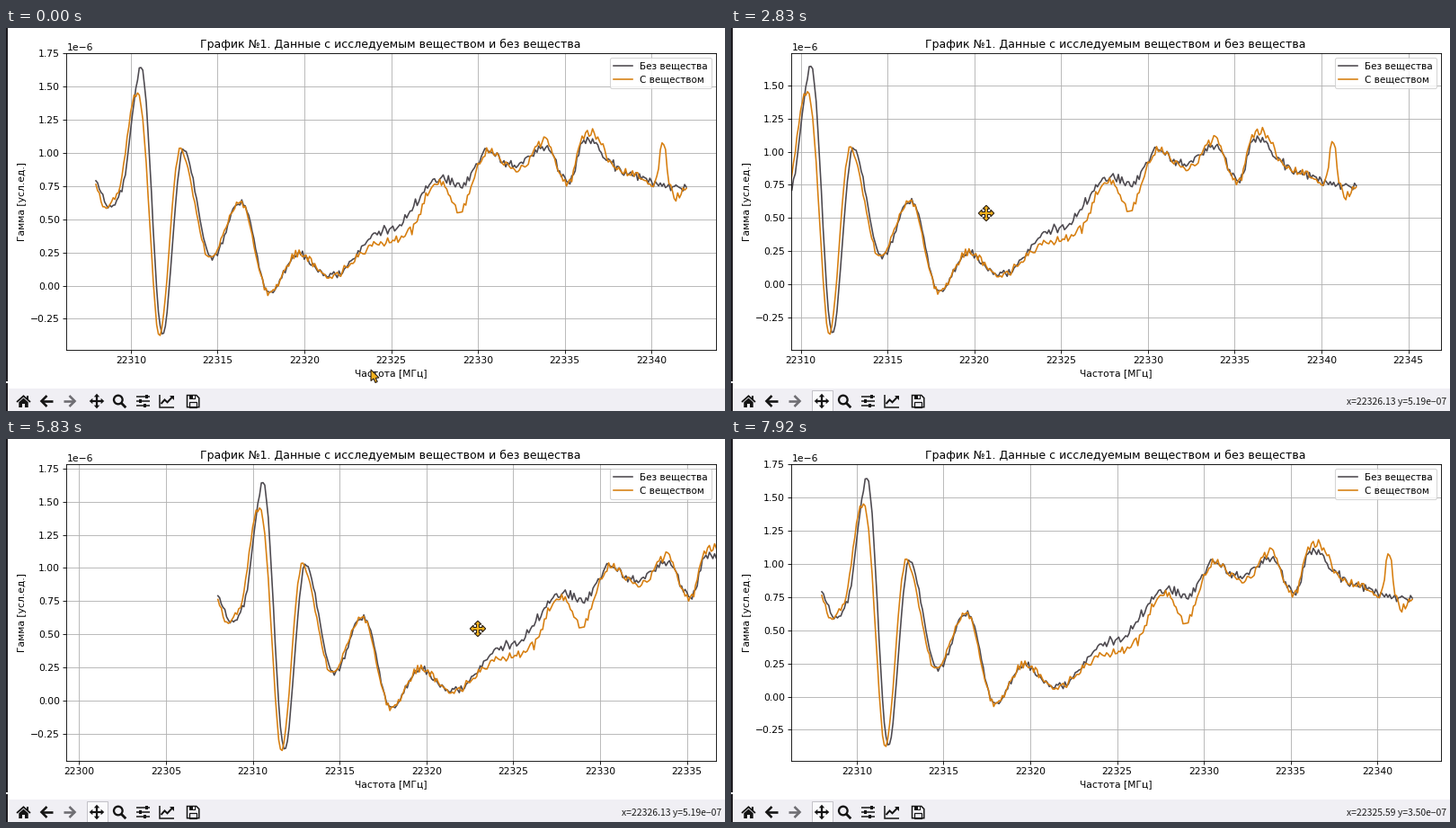
A matplotlib script that plays this animation: 800x426 px, repeating every 8000 ms.

```python
import numpy as np
import matplotlib.pyplot as plt
from matplotlib.animation import FuncAnimation
from matplotlib.patches import Circle, Polygon, Rectangle

W, H, DPI = 800, 426, 72          # at 72 dpi one point is one pixel
LOOP, INTERVAL, STEP = 8000, 40, 1000 / 12
PT = 77 / 72                      # scale of the plotted window's own points
LEFT, RIGHT, TOP, BOTTOM = 67.4, 789.8, 28, 357.5
X0, X1 = 22306.3, 22343.7
Y1 = 1.752e-6
PX = (RIGHT - LEFT) / (X1 - X0)   # pixels per MHz
PY = 147.6e6                      # pixels per unit of gamma
Y0 = Y1 - (BOTTOM - TOP) / PY
INK, ORANGE, ICON = "#4d494f", "#d77f10", "#141414"

plt.rcParams.update({
    "font.family": "DejaVu Sans", "font.size": 10 * PT,
    "axes.linewidth": 0.8 * PT, "grid.linewidth": 0.8 * PT,
    "lines.linewidth": 1.5 * PT, "axes.titlepad": 6 * PT,
    "axes.labelpad": 4 * PT, "toolbar": "None",
    "patch.linewidth": PT,
})
for side in ("xtick", "ytick"):
    plt.rcParams.update({side + ".major.size": 3.5 * PT,
                         side + ".major.pad": 3.5 * PT,
                         side + ".major.width": 0.8 * PT})


def smooth(x, xs, ys):
    """Monotone cubic through the knots, flat outside them."""
    xs, ys = np.asarray(xs, float), np.asarray(ys, float)
    h = np.diff(xs)
    d = np.diff(ys) / h
    prod = d[:-1] * d[1:]
    m = np.zeros(len(xs))
    total = np.where(prod > 0, d[:-1] + d[1:], 1)
    m[1:-1] = np.where(prod > 0, 2 * prod / total, 0)
    i = np.clip(np.searchsorted(xs, x, "right") - 1, 0, len(xs) - 2)
    s = np.clip((x - xs[i]) / h[i], 0, 1)
    return (ys[i] * (1 + 2 * s) * (1 - s) ** 2 + ys[i + 1] * s * s * (3 - 2 * s)
            + h[i] * s * (1 - s) * (m[i] * (1 - s) - m[i + 1] * s))


def to_data(px, py):
    return X0 + (px - LEFT) / PX, Y1 - (py - TOP) / PY


# Peaks and troughs of the plain curve, in pixels of the home view.
TURNS = [(100, 171), (114, 200), (129, 179), (150.5, 44), (174, 342),
         (197, 135), (229, 256), (261.5, 193), (293, 294), (325, 251),
         (362, 276), (416, 226), (430, 223), (486, 166), (504, 177),
         (535, 137), (563, 153), (600, 131), (626, 172), (644, 123),
         (685, 159), (757, 178)]
# What the substance adds to it: centre, height, width.
BUMPS = [(148, 29, 6), (425, 14, 22), (454, 18, 10), (506, 27, 12),
         (575, 8, 10), (602, -10, 6), (655, -10, 8), (731, -48, 4),
         (746, 11, 6)]


def plain(px):
    return smooth(px, *zip(*TURNS))


def sample(px):
    lead = np.interp(px, [200, 260], [3.4, 0.6])
    return plain(px + lead) + sum(
        a * np.exp(-((px - c) / w) ** 2 / 2) for c, a, w in BUMPS)


def noisy(shape, seed):
    px = np.linspace(100, 757, 341)
    jitter = np.random.default_rng(seed).normal(0, 1, px.size).clip(-1.8, 1.8)
    amp = np.interp(px, [200, 450], [1.7, 3])
    return to_data(px, shape(px) + amp * jitter)


# Mouse and plot shift over time: ms, x, y. The redraw lags behind the mouse.
MOUSE = [(0, 406, 380), (750, 104, 413), (917, 104, 413), (1700, 450, 210),
         (2333, 284, 206), (2917, 284, 206), (3667, 491, 211),
         (4750, 608, 215), (5833, 525, 211), (6917, 450, 211),
         (7250, 441, 445)]
SHIFT = [(2250, 0, 0), (2333, -1.8, 0), (3667, -167, -4.5), (4583, 77, -0.6),
         (4833, 77, -0.6), (5330, 158, 5), (5833, 135.8, 4.5),
         (6917, 47.8, 0), (7300, 1, 0)]
PAN_ON, DRAG, RELEASE = 830, 1750, 7580


def track(keys, t):
    ts, xs, ys = zip(*keys)
    return float(smooth(t, ts, xs)), float(smooth(t, ts, ys))


fig = plt.figure(figsize=(W / DPI, H / DPI), dpi=DPI, facecolor="white")
ax = fig.add_axes([LEFT / W, 1 - BOTTOM / H,
                   (RIGHT - LEFT) / W, (BOTTOM - TOP) / H])
ax.plot(*noisy(plain, 4), color=INK, label="Без вещества")
ax.plot(*noisy(sample, 9), color=ORANGE, label="С веществом")
ax.set_title("График №1. Данные с исследуемым веществом и без вещества",
             fontsize=12.46, x=0.4988)
ax.set_xlabel("Частота [МГц]")
ax.set_ylabel("Гамма [усл.ед.]")
ax.grid(True)
ax.legend(loc="upper right", fontsize=10.35)

ui = fig.add_axes([0, 0, 1, 1], zorder=5)
ui.set(xlim=(0, W), ylim=(H, 0))
ui.axis("off")


def rect(x, y, w, h, color, **kw):
    return ui.add_patch(Rectangle((x, y), w, h, fc=color,
                                  **{"ec": "none", **kw}))


def poly(pts, color, **kw):
    return ui.add_patch(Polygon(pts, fc=color, **{"ec": "none", **kw}))


def stroke(xs, ys, lw=1.6, color=ICON):
    ui.plot(xs, ys, color=color, lw=lw, solid_capstyle="butt",
            solid_joinstyle="miter")


def cross(r, head, shaft):
    """Four-way arrow around the origin."""
    base = r * 0.56
    arm = np.array([(shaft, -shaft), (shaft, -base), (head, -base), (0, -r),
                    (-head, -base), (-shaft, -base)])
    turn = np.array([(0, -1), (1, 0)])
    return np.vstack([arm @ np.linalg.matrix_power(turn, k)
                      for k in range(4)])


def arrow(cx, color, d):
    stroke([cx - 5 * d, cx + 7 * d], [415, 415], 2.6, color)
    stroke([cx + 0.5 * d, cx - 5.5 * d, cx + 0.5 * d], [409, 415, 421],
           2.6, color)


def toolbar():
    rect(0, 401, W, 25, "#f0eff4")
    rect(0, 0, 1.5, 393, "#1d1b20")
    rect(0, 395, 1.5, 31, "#1d1b20")
    button = rect(89.5, 402.5, 23, 24, "#fafafc", ec="#c3c2c8", lw=1)
    # home
    stroke([12, 19.5, 27], [416, 409.3, 416], 1.8)
    rect(23.3, 409, 2, 4, ICON)
    poly([(14.3, 416.2), (19.5, 411.6), (24.7, 416.2), (24.7, 422),
          (14.3, 422)], ICON)
    rect(18, 418, 3, 4, "#f0eff4")
    arrow(45, ICON, 1)
    arrow(71, "#6e6d72", -1)
    poly(cross(8.3, 3.2, 1.1) + (101, 415), ICON)
    # magnifier
    ui.add_patch(Circle((124.8, 413.5), 4.8, fill=False, ec=ICON, lw=2.3))
    stroke([128, 133.3], [416.8, 422.2], 2.8)
    # sliders
    for y, knob in ((410, 155), (415, 148), (420, 153)):
        stroke([145, 160], [y, y], 1.5)
        rect(knob, y - 2, 2.8, 4, ICON)
    # chart
    stroke([170.5, 170.5, 187], [408, 421.5, 421.5], 1.5)
    stroke([172.5, 176.5, 179.5, 185], [418, 413.5, 416.3, 410.5], 2)
    poly([(181.8, 408.8), (186.5, 408.8), (186.5, 413.5)], ICON)
    # floppy disk
    poly([(201.5, 408.5), (211.8, 408.5), (214.8, 411.5), (214.8, 421.7),
          (201.5, 421.7)], "none", ec=ICON, lw=1.5)
    rect(204, 408.5, 7, 4.6, ICON)
    rect(208, 409.3, 1.8, 2.8, "#f0eff4")
    rect(204, 416.2, 8.3, 5.5, "none", ec=ICON, lw=1.2)
    return button


button = toolbar()
status = ui.text(796, 419, "", ha="right", va="baseline", fontsize=10.4,
                 family="Noto Sans CJK JP", color="#1c1c1c")
MOVE = cross(8.7, 3.9, 1.5)
POINTER = np.array([(0, 0), (0, 12.5), (3, 10), (5, 14.5), (7.2, 13.4),
                    (5.3, 9.3), (9, 9)])
pointer = poly(POINTER, "#f4b21c", ec="#2a2018", lw=1.1, zorder=9)


def readout(t, mx, my):
    if t >= RELEASE:
        x, y = 22325.59, 3.5e-7
    elif t >= DRAG:
        x, y = 22326.13, 5.19e-7
    elif t > PAN_ON and LEFT < mx < RIGHT and TOP < my < BOTTOM:
        x, y = to_data(mx, my)
    else:
        return ""
    return f"x={x:.2f} y={y:.2e}".replace("-", "\u2212")


def draw(i):
    t = round(i * INTERVAL / STEP) * STEP   # the screen refreshes 12 times a second
    dx, dy = track(SHIFT, t)
    ax.set_xlim(X0 - dx / PX, X1 - dx / PX)
    ax.set_ylim(Y0 + dy / PY, Y1 + dy / PY)
    mx, my = track(MOUSE, t)
    panning = t >= PAN_ON
    inside = LEFT < mx < RIGHT and my < BOTTOM
    pointer.set_xy((MOVE if panning and inside else POINTER) + (mx, my))
    button.set_visible(panning)
    status.set_text(readout(t, mx, my))
    return []


anim = FuncAnimation(fig, draw, frames=LOOP // INTERVAL, interval=INTERVAL,
                     init_func=lambda: draw(0), repeat=True, repeat_delay=0)
plt.show()
```
